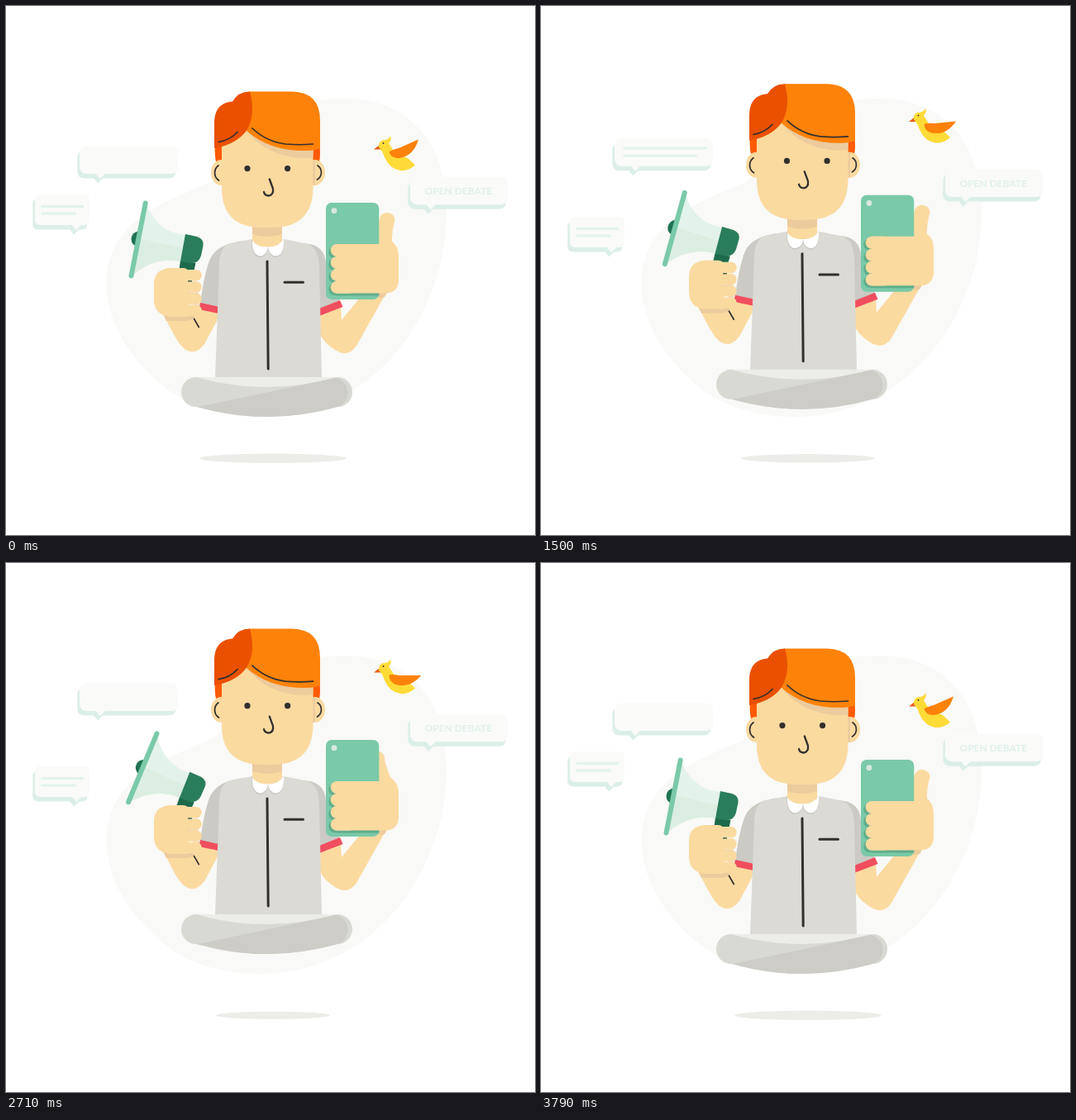
These frames come from a looping animation (640 px wide and 640 px high, 3.87 s). An HTML page:

```html
<!DOCTYPE html>
<html lang="en">
<head>
<meta charset="utf-8">
<title>Open debate</title>
<style>
html, body { margin: 0; width: 100%; height: 100%; overflow: hidden; background: #fff; }
svg { display: block; width: 100vw; height: 100vh; }
.skin { fill: #fbdaa0; }
.shade { fill: #eccb9d; }
.ink { fill: none; stroke: #332f2e; stroke-linecap: round; stroke-linejoin: round; }
.mint { fill: #7ac9a8; }
.orange { fill: #fd8209; }
.dark { fill: #ea5000; }
.ginger { fill: #ff5a05; }
.shirt { fill: #dbdad5; }
.sleeve { fill: #cbcac4; }
.red { fill: #f04e5e; }
.face { fill: #fafaf9; }
.edge { fill: #dceee8; }
.note { fill: none; stroke: #e3f3ea; stroke-width: 3.4; stroke-linecap: round; }
text { font: 700 12px Lato, "Open Sans", sans-serif; fill: #dff0e9; }
</style>
</head>
<body>
<svg viewBox="0 0 640 640">
  <defs>
    <clipPath id="page"><rect x="92" y="172" width="114" height="24.3"/></clipPath>
  </defs>
  <path fill="#f9f9f7" d="M410 112C355 111 325 130 296 165C272 194 262 205 245 214C205 233 121 255 121.500 336C122 405 184 463 222 480C252 493 280 497.500 310 497C450 495 533 368 533 250C533 158 482 112 410 112Z"/>
  <ellipse id="shadow" cx="323" cy="547.300" fill="#ecece8"/>

  <g id="chat">
    <g clip-path="url(#page)"></g>
  </g>
  <g id="memo"></g>
  <g id="debate"></g>

  <g id="bird">
    <path fill="#ec5a12" d="M445 173.500L452 168L454 173.500Z"/>
    <path fill="#ffdb37" d="M451 171Q450 162 459 162Q464 161 465 157Q467 162 463 166L470 177L486 184L495 192.500Q487 200 477 199Q464 197 458 183Q455 174 451 171Z"/>
    <circle cx="456.500" cy="166" r=".9" fill="#332f2e"/>
    <path id="wing" class="orange" d="M463.500 176.500Q467 174 475 172L499 161.500Q493 182 475 184Q466 184.500 463.500 176.500Z"/>
  </g>

  <g id="body">
    <!-- arms -->
    <path class="skin" d="M232 362L258 368L255 381L240 409Q226 427 211 410Q203 399 190 372Z"/>
    <path class="skin" d="M379 372L405 362L406 380L428 353L440 340H464L424 411Q414 426 398 416Q384 407 379 396Z"/>
    <path class="shade" d="M445 347H461L458 352Q454 354 449 352Z"/>
    <path class="sleeve" d="M290 284Q252 287 245 311Q239 329 235 360L258 365L275 300Z"/>
    <path class="sleeve" d="M355 287Q386 286 387 312L392 345L404 356L379 367Z"/>
    <path class="red" d="M235 359L258 364L257 372L233 367Z"/>
    <path class="red" d="M379 366L404 356L407.500 364L379 375Z"/>

    <!-- torso and legs -->
    <path class="shirt" d="M253 450L258 312Q259 289 273 287L298 282H336L361 287Q378 290 379 314L382 450Z"/>
    <path fill="#ecede9" d="M230 449H401L395 470H236Z"/>
    <path fill="#d9d9d4" d="M230 449Q315 473 401 449A18 18 0 0 1 401 485Q315 509 230 485A18 18 0 0 1 230 449Z"/>
    <path fill="#cdccc6" d="M232 485L330 464.500L398 450A18 18 0 0 1 401 485Q316 509 232 485Z"/>
    <path class="ink" stroke-width="3" d="M316 309L317.200 439M337 334.300H359.500"/>

    <!-- neck and collar -->
    <path class="skin" d="M298 255H334V284Q316 299 298 284Z"/>
    <path class="shade" d="M298 262H334V276Q316 282 298 276Z"/>
    <g id="collar">
      <path fill="#c9c8c2" d="M297 283Q297 304 308 304Q317 302 317 293Q317 302 326 304Q337 303 336 283Z"/>
      <path fill="#fff" d="M298 281Q303 291 317 291Q316 302 307 302.500Q297 301 298 281Z"/>
      <path fill="#fff" d="M336 281Q331 291 317 291Q318 302 327 302.500Q337 301 336 281Z"/>
      <path class="skin" d="M298 279H334V284Q328 291.500 316 291.500Q304 291.500 298 284Z"/>
    </g>

    <!-- head -->
    <path class="ginger" d="M253 165H264V188H254Q252 180 253 165ZM370 165H379Q381 180 379 188H370Z"/>
    <ellipse class="skin" cx="260.500" cy="201.500" rx="12.500" ry="15.500"/>
    <ellipse class="skin" cx="373.500" cy="201.500" rx="12.500" ry="15.500"/>
    <path class="shade" d="M371 186H374V217H370Z"/>
    <path class="skin" d="M261 150H371.500V220Q371 268 322 268H310Q261 268 261 220Z"/>
    <path class="shade" d="M288 148Q320 188 371.500 183.500V165L300 145Z"/>
    <path class="orange" d="M294 103.500H346Q380 104 380 139V172Q374 175 364 175Q318 176 290 150Z"/>
    <path class="dark" d="M252 172V140Q253 117 274 115.500Q281 103.500 295 103.500Q303 133 290 152Q277 168 252 172Z"/>
    <path class="ink" stroke-width="1.700" d="M257 164.500Q270 163 280 152.500M298 148Q315 164 338 167Q355 168.500 371.500 167M257 193C251 197 251 207 257.500 211M377 193C383 197 383 206 376.500 210"/>
    <g id="eyes" fill="#332f2e">
      <circle cx="292" cy="196.600" r="3.600"/>
      <circle cx="340.600" cy="196.600" r="3.600"/>
    </g>
    <path class="ink" stroke-width="2.300" d="M318.800 209.500L323 221Q324 228.500 318 229.500Q313 229.500 312 225"/>

    <!-- megaphone and fist -->
    <g id="horn">
      <path fill="#1d6a4a" d="M211 308L229.500 311L227 322L224 333L208 330Z"/>
      <circle cx="161" cy="282" r="9.500" fill="#1f7352"/>
      <path fill="#e3f3eb" d="M170 241Q184 274 217 277L211 309Q181 303 154 325Z"/>
      <path fill="#dceee1" d="M161 281L214 293L211 309Q181 303 154 325Z"/>
      <path fill="#2a7d5a" d="M217 276L231 279Q240 282 238.500 290L236 302Q233 312 223 311L211 309Z"/>
      <path d="M168.700 238.500L151.500 326.500" stroke="#7ac9a8" stroke-width="6" stroke-linecap="round"/>
    </g>
    <path class="shade" d="M190 373H228V378Q224 381 216 381H194Z"/>
    <path class="skin" d="M199 317H214Q219 317 221 321V376H199Q179 374 179 355V337Q179 318 199 317Z"/>
    <g id="fist" class="skin"></g>
    <path d="M220 332.900H225" stroke="#2f5a43" stroke-width="1.300"/>
    <path d="M219 347.300H233M226 361H235" stroke="#eccb9d" stroke-width=".9"/>
    <path class="ink" stroke-width="1.700" d="M227.500 378.500L233.300 388.500"/>

    <!-- phone and hand -->
    <path id="thumb" class="skin" d="M451 296V264Q451 250 461 250Q471 251 470.500 260Q466 272 467 296Z"/>
    <rect class="mint" x="387" y="238" width="64.300" height="117" rx="7"/>
    <circle cx="397" cy="247.700" r="3.400" fill="#d8e9dc"/>
    <g id="grip" fill="#5fae8c"></g>
    <g id="hand" class="skin">
      <path d="M400 288H456L466 284Q475 290 475 303V332Q474 347.500 459 347.500H400Z"/>
    </g>
  </g>
</svg>
<script>
const NS = "http://www.w3.org/2000/svg";
const $ = id => document.getElementById(id);

function add(parent, tag, attrs) {
  const el = document.createElementNS(NS, tag);
  for (const k in attrs) el.setAttribute(k, attrs[k]);
  parent.append(el);
  return el;
}

// Speech bubble: an offset edge below, a pale face on top.
function bubble(parent, x, y, w, h, tail, r) {
  const base = y + h;
  const layer = (cls, dx, dy) => {
    const g = document.createElementNS(NS, "g");
    g.setAttribute("class", cls);
    g.setAttribute("transform", `translate(${dx} ${dy})`);
    add(g, "rect", { x, y, width: w, height: h, rx: r });
    add(g, "path", { d: `M${tail - 6} ${base - 1}L${tail} ${base + 6}L${tail + 7} ${base - 1}Z` });
    return g;
  };
  parent.prepend(layer("edge", -2.7, 5.5), layer("face", 0, 0));
}

const lines = (parent, d) => add(parent, "path", { class: "note", d });

bubble($("chat"), 89, 169.5, 119, 33.5, 114, 8);
const typed = lines($("chat").querySelector("[clip-path]"), "M101 181.300H199.500M101 190.300H187.500");
bubble($("memo"), 35, 228, 66, 37, 85, 6);
lines($("memo"), "M44 242.500H92.500M44 251H83");
bubble($("debate"), 489, 206.7, 118.5, 33.5, 513.5, 8);
add($("debate"), "text", { x: 506.5, y: 228.4 }).textContent = "OPEN DEBATE";

for (let i = 0; i < 4; i++) {
  const y = 288 + i * 14.9;
  add($("grip"), "rect", { x: 390.3, y: y + 2.5, width: 30, height: 15, rx: 7.5 });
  add($("hand"), "rect", { x: 392.7, y, width: 30, height: 15, rx: 7.5 });
  add($("fist"), "rect", { x: 203, y: 319 + i * 14.2, width: 33.7, height: 13.4, rx: 6.5 });
}
add($("grip"), "rect", { x: 400, y: 340, width: 51.3, height: 10.5 });

const LOOP = 3870, SPAN = 3790, STEP = 71.5;
const wave = p => (1 - Math.cos(2 * Math.PI * p)) / 2;
const ease = (t, a, b) => wave(Math.min(1, Math.max(0, (t - a) / (b - a))) / 2);
const pulse = (t, a, b, c, d) => ease(t, a, b) - ease(t, c, d);

// Eased travel through [time, value] stops.
function track(t, stops) {
  let v = stops[0][1];
  for (let i = 1; i < stops.length; i++) {
    const [a, from] = stops[i - 1], [b, to] = stops[i];
    v += (to - from) * ease(t, a, b);
  }
  return v;
}

const move = (el, x, y) => el.setAttribute("transform", `translate(${x} ${y})`);
const turn = (el, a, x, y) => el.setAttribute("transform", `rotate(${a} ${x} ${y})`);

function draw(t) {
  const lift = wave(t / (SPAN / 2));
  const y = -25 * lift;
  for (const id of ["body", "chat", "debate"]) move($(id), 0, y);
  move($("memo"), 0, 30 * wave(t / SPAN));
  $("shadow").setAttribute("rx", 88.6 - 21 * lift);
  $("shadow").setAttribute("ry", 5.7 - 1.2 * lift);

  turn($("horn"), 12 * lift, 216, 303);
  turn($("thumb"), -25 * (pulse(t, 250, 550, 980, 1200) + pulse(t, 2390, 2690, 3120, 3340)), 459, 288);
  move($("eyes"), 5.5 * pulse(t, 900, 1050, 2200, 2350), 0);
  move(typed, 0, 17 * (1 - pulse(t, 500, 900, 2200, 2550)));

  move($("bird"), 0, track(t, [[0, 0], [1055, -41], [1895, -27.5], [2735, -41], [SPAN, 0]]));
  turn($("wing"), track(t, [[0, 0], [1100, 29], [1895, 7], [2690, 24], [SPAN, 0]]), 464, 177);
}

// The motion advances in even steps and rests briefly at the end.
function tick() {
  const t = performance.now() % LOOP;
  draw(Math.min(SPAN, Math.floor((t + 8) / STEP) * STEP));
  requestAnimationFrame(tick);
}
tick();
</script>
</body>
</html>
```
